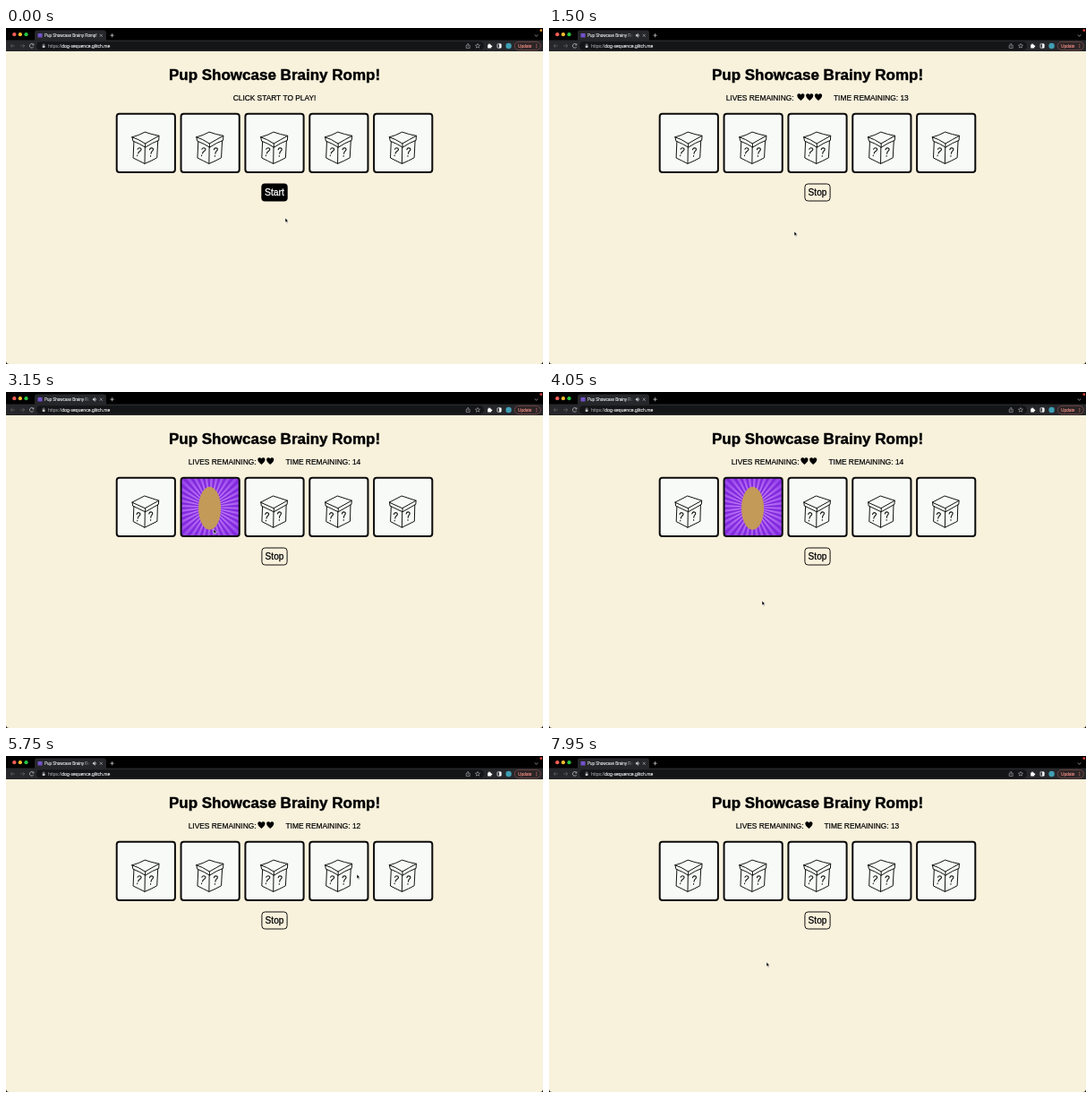
An HTML page with a canvas that plays this animation: 600 px wide and 375 px high, repeating every 8 s.

```html
<!DOCTYPE html>
<html lang="en">
<head>
<meta charset="utf-8">
<title>Pup Showcase Brainy Romp!</title>
<style>
  html, body { margin: 0; width: 100%; height: 100%; overflow: hidden; background: #f8f1dc; }
  canvas { display: block; width: 600px; height: 375px; }
</style>
</head>
<body>
<canvas id="stage"></canvas>
<script>
const LOOP = 8000;
const NAME = 'Pup Showcase Brainy Romp!';
const SANS = '"Liberation Sans", Arial, sans-serif';
const CREAM = '#f8f1dc', BAR = '#26272a', ICON = '#c6c7ca', FAINT = '#67686b';
const TILE = { x: 122.7, y: 94.8, size: 67.2, pitch: 71.85 };

const START = 250;
const lives = [[0, 3], [2150, 2], [5950, 1]];
const seconds = [[0, 14], [1300, 13], [2150, 15], [3120, 14], [4120, 13],
  [5120, 12], [5950, 15], [6920, 14], [7920, 13]];
// [from, to, tile]
const reveals = [[300, 1250, 1], [2100, 2400, 0], [3100, 4120, 1], [5880, 6120, 3], [6900, 7920, 1]];
// [time, x, y] of the pointer tip
const path = [[0, 312, 212], [60, 312, 212], [200, 304, 186], [300, 304, 186], [800, 274, 227],
  [1500, 274, 227], [1700, 236, 198], [2050, 166, 146], [2350, 166, 146], [2650, 198, 203],
  [3000, 232, 153], [3600, 232, 153], [4000, 238, 233], [5150, 238, 233], [5700, 392, 132],
  [5950, 392, 132], [6350, 302, 235], [6650, 250, 190], [6850, 232, 151], [7650, 232, 153],
  [7900, 243, 230], [8000, 243, 230]];

const canvas = document.getElementById('stage');
const ctx = canvas.getContext('2d');
const scale = window.devicePixelRatio || 1;
canvas.width = 600 * scale;
canvas.height = 375 * scale;

const valueAt = (steps, t) => steps.filter(s => s[0] <= t).pop()[1];

function pointerAt(t) {
  const i = Math.max(1, path.findIndex(p => p[0] > t));
  const [t0, x0, y0] = path[i - 1], [t1, x1, y1] = path[i];
  const u = (t - t0) / (t1 - t0), e = u * u * (3 - 2 * u);
  return [x0 + (x1 - x0) * e, y0 + (y1 - y0) * e];
}

// A hairline stroke gives the text a slightly heavier cut.
function text(str, x, y, size, color, align = 'left', weight = '') {
  ctx.font = `${weight} ${size}px ${SANS}`;
  ctx.textAlign = align;
  ctx.fillStyle = ctx.strokeStyle = color;
  ctx.lineWidth = size * 0.025;
  ctx.fillText(str, x, y);
  ctx.strokeText(str, x, y);
}

function round(x, y, w, h, r, fill, stroke, width = 1) {
  ctx.beginPath();
  ctx.roundRect(x, y, w, h, r);
  if (fill) { ctx.fillStyle = fill; ctx.fill(); }
  if (stroke) { ctx.strokeStyle = stroke; ctx.lineWidth = width; ctx.stroke(); }
}

function dot(x, y, r, fill) {
  ctx.beginPath();
  ctx.arc(x, y, r, 0, Math.PI * 2);
  ctx.fillStyle = fill;
  ctx.fill();
}

function draw(d, stroke, width, fill) {
  const p = new Path2D(d);
  if (fill) { ctx.fillStyle = fill; ctx.fill(p); }
  if (stroke) { ctx.strokeStyle = stroke; ctx.lineWidth = width; ctx.stroke(p); }
}

function at(x, y, fn) {
  ctx.save();
  ctx.translate(x, y);
  fn();
  ctx.restore();
}

function drawTabs(playing) {
  ctx.fillStyle = '#000';
  ctx.fillRect(0, 0, 600, 14);
  ['#fe5f57', '#febc2e', '#28c840'].forEach((c, i) => dot(9.3 + i * 6.6, 7.2, 2.1, c));
  round(32, 2.5, 80, 14, 3, BAR);
  round(35.5, 6, 5, 4.6, 0.5, '#7352c9');
  ctx.save();
  ctx.beginPath();
  ctx.rect(42, 3, playing ? 52 : 61, 10);
  ctx.clip();
  let ink = '#e6e7e9';
  if (playing) {
    ink = ctx.createLinearGradient(86, 0, 94, 0);
    ink.addColorStop(0, '#e6e7e9');
    ink.addColorStop(1, BAR);
  }
  text(NAME, 43, 9.9, 4.5, ink);
  ctx.restore();
  if (playing) draw('M97 7.5h1l1.4-1.3v4.2l-1.4-1.3h-1z M100.3 7q.9 1.3 0 2.6', ICON, 0.4, ICON);
  draw('M104.8 6.8l3 3m0-3l-3 3', ICON, 0.6);
  draw('M116.5 8.2h4.2m-2.1-2.1v4.2', ICON, 0.8);
  draw('M590.7 7.5l1.8 1.7 1.8-1.7', ICON, 0.7);
  dot(597.8, 2.7, 1.4, playing ? '#d8453b' : '#f09a37');
}

function drawToolbar() {
  ctx.fillStyle = BAR;
  ctx.fillRect(0, 13.5, 600, 12.5);
  draw('M10 20H5.2m2.1-2.1L5.2 20l2.1 2.1', FAINT, 0.7);
  draw('M16 20h4.8m-2.1-2.1l2.1 2.1-2.1 2.1', FAINT, 0.7);
  draw('M30.6 18.6a2.3 2.3 0 1 0 .2 2.2M30.9 17.4v1.6h-1.6', ICON, 0.7);
  round(34, 15.2, 500, 9.6, 4.8, '#141517');
  round(40.7, 19.4, 2.8, 2.5, 0.4, ICON);
  draw('M41.2 19.5v-.8a.9.9 0 0 1 1.8 0v.8', ICON, 0.5);
  text('https://', 47, 21.8, 5.1, '#8e9094');
  text('dog-sequence.glitch.me', 47 + ctx.measureText('https://').width, 21.8, 5.1, '#e6e7e9');
  draw('M515 19.4h-.8v3h4v-3h-.8M516.2 21v-3.6m-1.2 1.2l1.2-1.2 1.2 1.2', ICON, 0.55);
  draw('M527 17.4l.7 1.7 1.9.1-1.4 1.2.4 1.8-1.6-1-1.6 1 .4-1.8-1.4-1.2 1.9-.1z', ICON, 0.5);
  round(538.2, 18.6, 3.9, 3.9, 0.5, '#fff');
  dot(540, 18.3, 0.9, '#fff');
  dot(542.4, 20.4, 0.9, '#fff');
  round(549, 17.8, 4.2, 4.4, 0.5, null, '#fff', 0.7);
  ctx.fillStyle = '#fff';
  ctx.fillRect(551.1, 17.8, 2.1, 4.4);
  dot(561.6, 20, 3.2, '#3f9fb5');
  round(568.3, 15.4, 29, 9.2, 4.6, '#2b2526', '#9b5650', 0.6);
  text('Update', 572, 21.7, 4.8, '#f28b82');
  [18.2, 20, 21.8].forEach(y => dot(592.8, y, 0.5, '#f28b82'));
}

function drawHeart(x, y) {
  at(x, y, () => draw('M0 4.2C-1.2 2.7-4.1 1-4.1-1.5C-4.1-4.2-1-4.4 0-2.3C1-4.4 4.1-4.2 4.1-1.5C4.1 1 1.2 2.7 0 4.2Z',
    null, 0, '#000'));
}

function drawStatus(t, playing) {
  if (!playing) return text('CLICK START TO PLAY!', 300, 80.9, 8.35, '#000', 'center');
  const n = valueAt(lives, t);
  const left = [0, 208.7, 203.7, 197.7][n];
  const hearts = left + (n === 3 ? 83.7 : 81.7);
  text('LIVES REMAINING:', left, 81.1, 8.4, '#000');
  for (let i = 0; i < n; i++) drawHeart(hearts + i * 9.8, 76.9);
  text('TIME REMAINING: ' + valueAt(seconds, t), [0, 307.5, 312.5, 318][n], 81.1, 8.4, '#000');
}

// Two hand-drawn poses, alternated for a wobbly line.
const BOXES = [
  'M18.3 27Q26 25 32.5 21.3Q40 24 48.3 25.5Q40 30 32.8 34.2Q25 29 18.3 27Z' +
  'M18.3 27L19.2 31.4Q27 34.4 33 38.4L32.8 34.2M33 38.4Q41 33 48 30.6L48.3 25.5' +
  'M20.2 32L19.4 50.2Q26 53.5 32.3 56.6L32.6 38.4M32.3 56.6Q40 53.4 46 50L47 31.2',
  'M18.4 28.2L32 21.2L48 26.4L33 34.7Z' +
  'M18.4 28.2L18.9 32.3L32.9 39L33 34.7M32.9 39L47.7 30.6L48 26.4' +
  'M20.2 33L19.5 49.8L32.3 56.4L32.6 38.9M32.3 56.4L46.2 49.5L46.7 31.2'
];
const QUERY = 'M-2-2.7Q-1.2-5.2 1-4.5Q3-3.4 1.2-1.4Q-.2-.2-.2 1.8M-.5 4.1L-.5 4.7';

function drawBox(pose) {
  ctx.lineJoin = ctx.lineCap = 'round';
  draw(BOXES[pose], '#111', 1);
  const marks = pose ? [[25, 44.5, 0.1], [39.2, 43.7, -0.05]] : [[25.6, 43.5, 0.25], [39.6, 43.7, 0.05]];
  for (const [x, y, tilt] of marks) {
    at(x, y, () => { ctx.rotate(tilt); draw(QUERY, '#111', 1.1); });
  }
  ctx.lineJoin = 'miter';
  ctx.lineCap = 'butt';
}

function drawBurst() {
  const c = TILE.size / 2, rays = 36;
  ctx.save();
  ctx.beginPath();
  ctx.roundRect(1, 1, TILE.size - 2, TILE.size - 2, 3);
  ctx.clip();
  ctx.fillStyle = '#8329dd';
  ctx.fillRect(0, 0, TILE.size, TILE.size);
  const glow = ctx.createRadialGradient(c, c, 5, c, c, 44);
  glow.addColorStop(0, '#c98cfb');
  glow.addColorStop(1, '#9440ea');
  ctx.fillStyle = glow;
  for (let i = 0; i < rays; i++) {
    const a = i * Math.PI * 2 / rays;
    ctx.beginPath();
    ctx.moveTo(c, c);
    ctx.arc(c, c, 50, a, a + Math.PI / rays);
    ctx.fill();
  }
  ctx.beginPath();
  ctx.ellipse(33, 35, 12.5, 24, 0, 0, Math.PI * 2);
  ctx.fillStyle = '#c39a58';
  ctx.fill();
  ctx.restore();
}

function drawTile(i, open, pose) {
  const side = TILE.size - 2;
  at(TILE.x + i * TILE.pitch, TILE.y, () => {
    round(1, 1, side, side, 3, '#f7faf7');
    open ? drawBurst() : drawBox(pose);
    round(1, 1, side, side, 3, null, '#0b0b0b', 2);
  });
}

function drawButton(playing) {
  if (playing) {
    round(285.9, 174, 28.2, 19, 3.5, null, '#111', 1);
    text('Stop', 300, 187.1, 10.1, '#000', 'center');
  } else {
    round(285.3, 173.5, 29.4, 20, 4, '#000');
    text('Start', 300, 187.1, 10.4, '#fff', 'center');
  }
}

function drawPointer(t) {
  const [x, y] = pointerAt(t);
  at(x, y, () => draw('M0 0V4.9L1.2 3.9L2 5.7L2.9 5.3L2.1 3.6H3.6Z', '#fff', 0.5, '#000'));
}

function render(t) {
  const playing = t >= START;
  const phase = t % 360;
  const pose = phase >= 85 && phase < 275 ? 1 : 0;
  const shown = reveals.find(([from, to]) => t >= from && t < to);
  ctx.setTransform(scale, 0, 0, scale, 0, 0);
  ctx.fillStyle = CREAM;
  ctx.fillRect(0, 0, 600, 375);
  drawTabs(playing);
  drawToolbar();
  text(NAME, 300, 58, 17, '#000', 'center', 'bold');
  drawStatus(t, playing);
  for (let i = 0; i < 5; i++) drawTile(i, shown && shown[2] === i, pose);
  drawButton(playing);
  drawPointer(t);
  draw('M0 371.5V375H3.5Q0 375 0 371.5ZM600 371.5V375H596.5Q600 375 600 371.5Z', null, 0, '#000');
}

const begin = performance.now();
function tick() {
  render((performance.now() - begin) % LOOP);
  requestAnimationFrame(tick);
}
tick();
</script>
</body>
</html>
```
